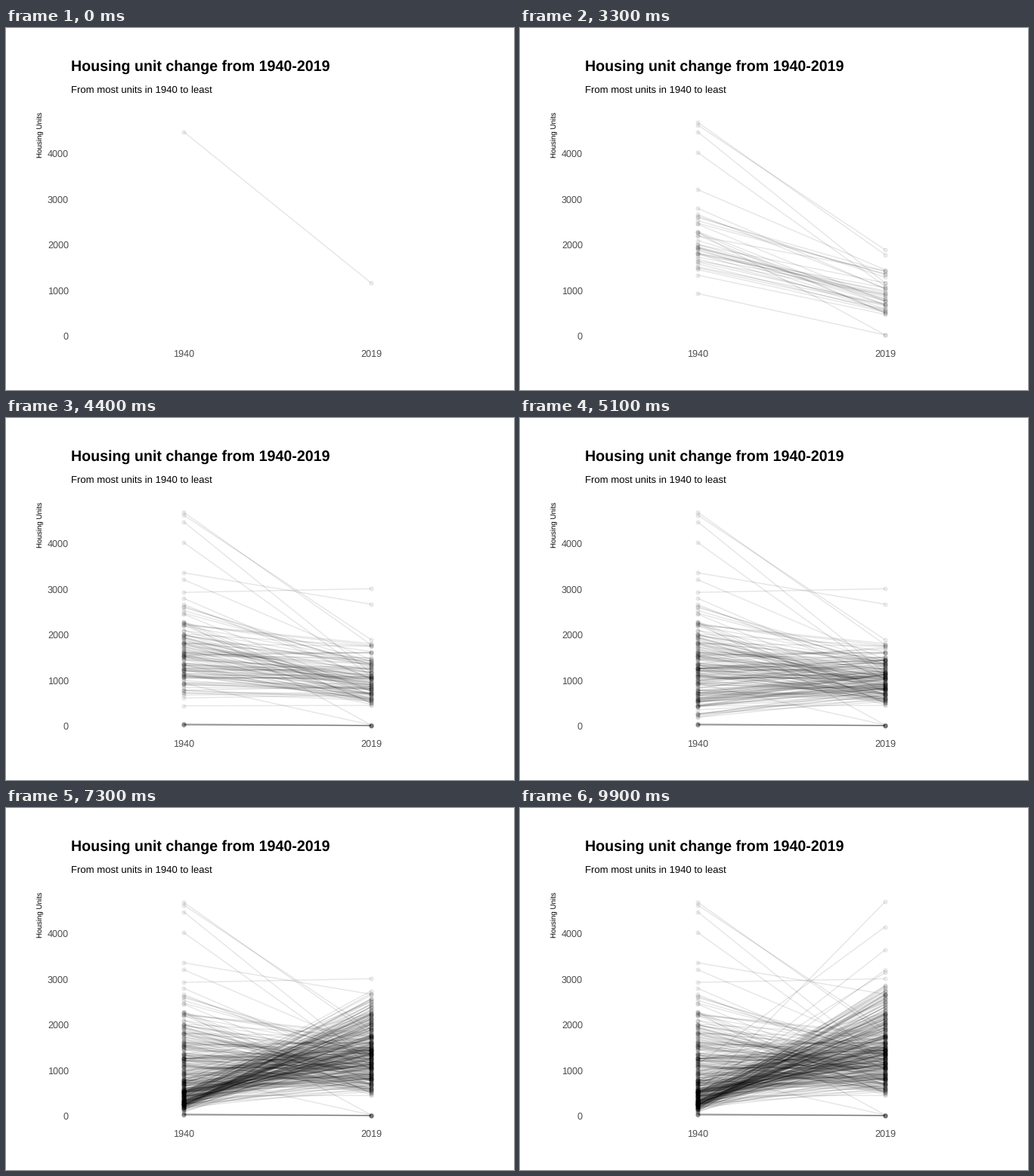
A matplotlib script for the animation above (10000 ms loop, 672 by 480 pixels).

```python
import matplotlib.pyplot as plt
import numpy as np
from matplotlib.animation import FuncAnimation
from matplotlib.collections import LineCollection

W, H, DPI = 672, 480, 96
FRAMES, INTERVAL = 100, 100
PX = 72 / DPI                       # points per pixel
X0, X1 = 235.0, 483.0               # the two years
FIRST, LAST = -3320, 4200           # smallest and largest change
STEP = (LAST - FIRST) / (FRAMES - 1)

plt.rcParams["font.family"] = "Liberation Sans"
plt.rcParams["text.hinting"] = "none"

# The tracts that stand clear of the crowd, as (1940, 2019)
OUTLIERS = [
    (4480, 1160), (4690, 1780), (4025, 1090), (4630, 1890), (2270, 20),
    (3210, 1450), (2800, 1030), (2270, 500), (930, 20), (3360, 2670),
    (2930, 3010), (250, 3200), (1130, 4150), (440, 3645), (500, 4700),
]


def ypos(units):
    return 408.2 - 0.0604 * units


def crowd(rng):
    """Random tracts: big losers start high, big gainers start low."""
    for k in [21, 22, *range(26, 74), *range(75, 79)]:
        count = round(np.interp(k, [22, 33, 44, 58, 78], [2, 4, 9, 9, 3]))
        for _ in range(count):
            change = FIRST + STEP * (k + rng.uniform(0.05, 0.95))
            low = max(60, 350 - change)
            top = 2000 + 0.45 * max(change, 0) - change
            mean = np.interp(change, [-1000, 0, 1000, 2000],
                             [600, 850, 520, 220])
            start = low + min(rng.gamma(2.5, mean / 2.5),
                              rng.uniform(0.2, 1) * (top - low))
            yield start, start + change
    for start in rng.uniform(10, 60, 7):
        yield start, 8


def label(x, mid, text, px, ha="left", color="black", **kw):
    ax.text(x, mid + 0.35 * px, text, fontsize=px * PX, ha=ha,
            va="baseline", color=color, **kw)


tracts = np.array(OUTLIERS + list(crowd(np.random.default_rng(19))))
change = tracts[:, 1] - tracts[:, 0]
tracts = tracts[np.argsort(change, kind="stable")]
step = np.floor((np.sort(change) - FIRST) / STEP + 1e-6)
xs = np.broadcast_to([X0, X1], tracts.shape)
segments = np.stack([xs, ypos(tracts)], axis=2)

fig = plt.figure(figsize=(W / DPI, H / DPI), dpi=DPI, facecolor="white")
ax = fig.add_axes([0, 0, 1, 1])
ax.set_xlim(0, W)
ax.set_ylim(H, 0)
ax.axis("off")

label(86, 50, "Housing unit change from 1940-2019", 19.65, weight="bold")
label(86, 81.5, "From most units in 1940 to least", 13.1)
label(44.5, 141.5, "Housing Units", 9.8, "center", rotation=90,
      rotation_mode="anchor") if False else ax.text(
    48, 141.5, "Housing Units", fontsize=9.8 * PX, rotation=90,
    rotation_mode="anchor", ha="center", va="baseline")
for units in range(0, 5000, 1000):
    label(83, ypos(units) + 0.3, str(units), 12.6, "right", "#4d4d4d")
for x, year in ((X0, "1940"), (X1, "2019")):
    label(x + 0.3, 431.5, year, 12.6, "center", "#4d4d4d")

lines = LineCollection([], colors=[(0, 0, 0, 0.1)], linewidths=1.42 * PX,
                       capstyle="butt")
ax.add_collection(lines, autolim=False)
dots, = ax.plot([], [], "o", ms=5.2 * PX, mew=0.94 * PX,
                mfc=(0, 0, 0, 0.07), mec=(0, 0, 0, 0.07))


def draw(i):
    shown = segments[step <= i]
    lines.set_segments(shown)
    dots.set_data(shown[..., 0].ravel(), shown[..., 1].ravel())
    return lines, dots


anim = FuncAnimation(fig, draw, frames=FRAMES, interval=INTERVAL,
                     repeat=True, repeat_delay=0)
plt.show()
```
